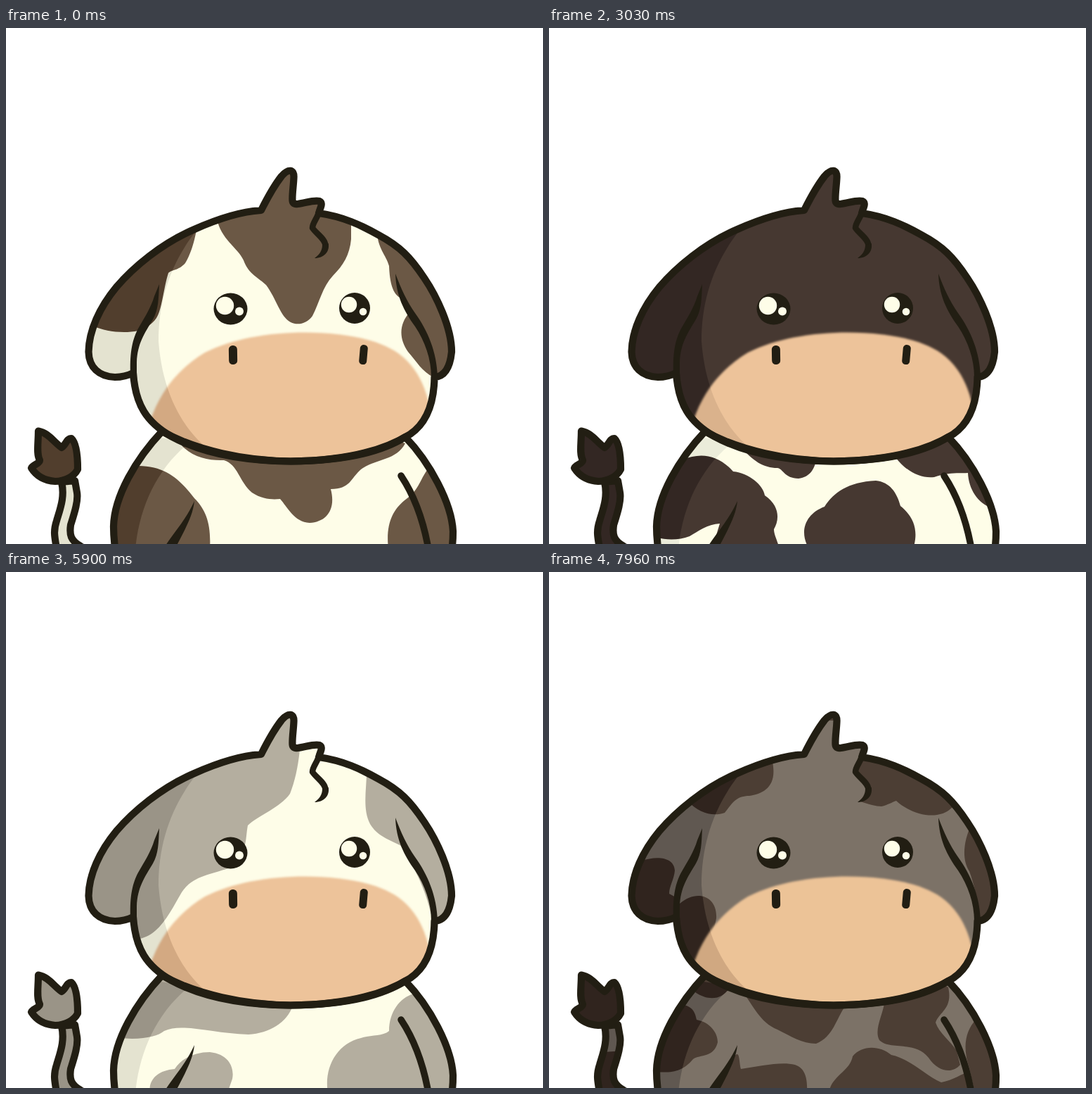
Recreate the animation shown at these times as an HTML page. Size 764 px wide and 733 px high, loop 8000 ms.

```html
<!DOCTYPE html>
<html lang="en">
<head>
<meta charset="utf-8">
<title>Cow coats</title>
<style>
html, body { margin: 0; width: 100%; height: 100%; overflow: hidden; background: #fff; }
svg { display: block; width: 100%; height: 100%; }
.coat { isolation: isolate; }
.shade { mix-blend-mode: difference; }
.line { fill: none; stroke: #221e13; stroke-width: 10.2; stroke-linecap: round; stroke-linejoin: round; }
.ink { fill: #221e13; }
.glint { fill: #fefde8; }
</style>
</head>
<body>
<svg viewBox="0 0 764 733" xmlns="http://www.w3.org/2000/svg">
  <defs>
    <path id="head" d="M363 259C372 241 383 222 392 210.5C402 199 410 201 409.5 212C409 225 407 235 407.5 245Q408 251 415 250C428 248 438 244 446 246Q450 248 448 254L445 263C480 268 505 280 530 294C560 310 575 325 595 355C612 380 634 425 634 460C632 480 625 495 609.5 496C609 530 600 560 575 577C530 605 470 615 405 615.5C340 615 280 605 235 580C200 560 184 535 181 490C175 493 166 496 155 496C132 495 118 482 117.5 460C118 430 133 397 157 368C181 340 221 306 268 286C295 274 330 261 363 259Z"/>
    <path id="body" d="M222 573C185 612 154 665 153 708Q153 725 156 745H633Q636 735 636 715C634 675 603 617 568 581C530 605 470 615 405 615.5C340 615 270 600 222 573Z"/>
    <path id="stem" d="M79 645C84 666 77 683 72 700C67 715 69 722 73 745H120L106 736C92 728 90 720 92 706C97 690 103 672 101 660L98 643Z"/>
    <path id="tuft" d="M46 572.5C60 575 68 588 79 596C85 593 86 583 93 583C101 590 102 612 102 627C97 637 84 644 70 644C55 643 43 636 36 625C40 619 48 619 48 614C43 605 46 590 46 572.5Z"/>
    <clipPath id="inHead"><use href="#head"/></clipPath>
    <clipPath id="inBody"><use href="#body"/><use href="#stem"/><use href="#tuft"/></clipPath>
    <filter id="soft"><feGaussianBlur stdDeviation="1.5"/></filter>
  </defs>
  <g id="coats"></g>
  <g class="line">
    <use href="#body"/>
    <use href="#stem"/>
    <use href="#tuft"/>
    <path stroke-width="9.5" d="M562 636C578 660 593 695 601 740"/>
    <use href="#head"/>
    <path stroke-width="8.5" d="M446 258C444 270 436 276 436 284C441 292 454 299 454.5 309"/>
  </g>
  <g class="ink">
    <path d="M458.7 306C461 318 452 327 439 327C446 322 450 316 450 308Z"/>
    <path d="M218 364C217 385 217 400 209 414C197 434 187 448 186 475V495L177 490C176 460 180 442 188 427C197 411 206 398 211 381Z"/>
    <path d="M554 349C562 370 570 388 582 405C600 430 613 460 614 496H605C605 470 596 445 582 424C566 402 555 380 554 349Z"/>
    <path d="M268 672C266 695 250 720 243 735H227C240 715 255 700 268 672Z"/>
    <ellipse cx="319.5" cy="399" rx="24" ry="22.5"/>
    <ellipse cx="496" cy="398" rx="22" ry="22"/>
    <rect x="317" y="451" width="12" height="27" rx="5.5" transform="rotate(-1 323 464)"/>
    <rect x="503" y="450" width="11" height="28" rx="5" transform="rotate(5 508 464)"/>
  </g>
  <g class="glint">
    <circle cx="311.5" cy="394.5" r="12.7"/>
    <circle cx="332" cy="402.5" r="6"/>
    <circle cx="488" cy="393" r="11.2"/>
    <circle cx="508" cy="403" r="5.3"/>
  </g>
</svg>
<script>
const ALL = "M0 0H764V740H0Z";
const TUFT = "M20 560H112V645H20Z";
const STEM = "M60 640H125V740H60Z";
const DARK = "#463831", BROWN = "#6b5845", TAN = "#9b8463", UMBER = "#5c4f3d";
const MUZZLE = "M200 575C212 530 235 490 283 461C323 441 375 432.5 425 432.5C480 433 527 441 558 462C582 479 597 507 603 540L620 640H200Z";
const HEAD_SHADE = "M277 280C235 330 217 385 217 445C222 510 245 565 292 602L80 620V250Z";
const BODY_SHADE = "M262 588C215 625 190 680 184 740H0V550Z";
const FAINT = "#13110e", LIGHT = "#1a1a18", DEEP = "#353532";

// Each coat: patch colour, shade strength, head patches, body and tail patches
const coats = [
  {
    color: BROWN, shade: LIGHT,
    head: [
      "M272 280C268 310 258 330 255 334C245 345 236 343 231 348C224 370 222 400 214 412C207 422 200 425 188 430C165 435 140 430 125 424L100 400L200 290Z",
      "M300 270C305 300 330 312 338 330C345 350 360 355 370 365C385 385 390 410 405 418C415 423 428 420 436 409C446 390 450 368 465 352C480 337 489 322 491 300V270L450 200L350 190Z",
      "M528 285C527 312 541 322 545 338C546 362 550 378 562 384C570 393 573 402 574 404C560 420 558 440 572 460C585 475 592 488 608 496L660 500L640 350L560 280Z"
    ],
    body: [
      "M250 593C265 610 290 615 310 614C330 620 332 645 350 660C365 670 380 670 390 669C400 680 410 702 432 703C455 702 470 685 462 655C490 655 490 640 505 627C525 612 555 615 568 590L500 570H300Z",
      "M140 650L188 622C230 622 250 645 268 668C285 685 292 705 290 740H140Z",
      "M604 622C588 640 590 655 567 671C550 685 540 705 544 740H660V640Z",
      TUFT
    ]
  },
  { color: BROWN, shade: LIGHT, head: [ALL], body: [ALL] },
  {
    color: TAN, shade: DEEP,
    head: [
      "M256 290C275 325 300 339 335 339C375 338 405 312 411 276C415 298 430 309 455 310C475 309 492 298 498 280L460 200L340 190Z",
      "M200 314C217 338 221 350 217 368L206 412L182 460V520H80L100 380Z",
      "M206 414C230 409 255 425 258 452C270 452 280 462 290 470L240 590H160L182 455Z",
      "M552 308C540 325 537 350 553 370L566 390C550 410 543 440 546 462L600 560H660V400L600 300Z"
    ],
    body: [
      "M182 636C200 650 230 660 255 657C280 655 300 640 302 626C315 635 340 632 358 618L220 555Z",
      "M168 655C172 685 200 700 210 740H130L140 660Z",
      "M270 740C285 715 288 690 312 686C340 682 385 700 393 720L397 740Z",
      "M466 615C445 630 437 645 439 660C445 680 470 685 485 692C500 705 515 713 535 713C560 713 575 700 592 700L604 740H660L640 600L560 560Z",
      TUFT, STEM
    ]
  },
  {
    color: DARK, shade: FAINT, head: [ALL],
    body: [
      "M272 594C290 615 305 625 325 625C332 625 335 640 355 640C372 638 378 625 380 614L300 585Z",
      "M190 613C215 603 240 605 262 630C285 632 305 650 307 664C330 680 327 700 320 712C320 720 325 728 328 740H232L243 704C225 705 212 715 200 722C185 728 165 727 155 724L130 700Z",
      "M370 740C355 715 365 690 392 680C405 660 425 645 465 643C485 645 495 660 500 679C520 695 526 715 518 740Z",
      "M493 610C510 632 530 640 548 638C570 630 585 633 596 632C597 655 610 675 630 682L650 680L580 560Z",
      TUFT, STEM
    ]
  },
  {
    color: DARK, shade: LIGHT,
    head: [
      "M331 262C340 290 360 300 386 299C400 310 412 323 427 326C440 338 455 335 462 320C468 308 467 300 470 289L486 286L491 291C484 305 488 328 508 331C526 332 530 316 527 305L536 298L500 250L440 200L360 190Z",
      "M546 303C540 325 530 340 534 362C540 382 555 387 568 386L584 416C595 418 610 412 622 404L660 400L600 300Z",
      "M596 438C610 436 620 430 632 424L660 500L604 525C600 505 585 485 584 465C585 450 592 442 596 438Z",
      "M248 294C255 312 275 320 295 317C310 312 315 295 312 268L280 262Z",
      "M235 296L240 318C258 325 274 338 274 357C273 375 258 388 235 389C225 390 218 397 208 397C200 385 185 387 175 390C165 393 155 392 140 390L120 380L200 290Z",
      "M115 441C140 432 160 442 164 465C166 480 164 490 163 505H100Z",
      "M206 418C230 410 250 420 251 440C250 458 225 470 218 485C212 500 200 507 184 502L178 460Z"
    ],
    body: ["M140 550H660V740H140Z", TUFT]
  },
  {
    color: DARK, shade: LIGHT,
    head: [
      "M419 240C417 270 412 295 404 315C390 335 360 345 344 360C340 380 345 400 316 421C290 430 265 432 250 455C235 480 220 515 190 521H80L100 380L340 190H420Z",
      "M513 278C514 305 506 335 518 358C528 375 545 380 562 389C590 435 600 460 609 505L660 500L640 380L560 280Z"
    ],
    body: [
      "M160 662C195 665 215 660 225 652C250 640 290 655 345 657C375 655 400 640 408 616L220 555L150 640Z",
      "M205 740C202 722 215 708 240 706C250 690 270 682 290 682C318 685 325 705 322 720L315 740Z",
      "M458 740C452 705 470 670 505 662C520 657 535 660 545 652C545 625 560 605 580 599L650 640L660 740Z",
      TUFT, STEM
    ]
  },
  { color: DARK, shade: LIGHT, head: [], body: [] },
  {
    color: UMBER, shade: "#31302a", muzzle: "#eac392",
    head: [
      "M196 324C215 345 235 347 250 342C260 330 265 318 285 318C305 315 325 305 318 270H270Z",
      "M447 258C442 275 436 283 438 285L452 300L456 312L443 326C455 330 465 333 473 333C482 331 488 327 494 325C510 340 535 348 552 345C565 343 570 338 576 332L500 250Z",
      "M602 356C588 385 588 410 598 425C605 445 612 470 610 500H660L640 380Z",
      "M130 411C155 402 178 406 179 424C178 437 171 446 171 457L184 464V505H100Z",
      "M186 471C210 450 240 460 238 492C235 510 228 520 222 530L245 595L160 560Z",
      "M395 211H413V195H395Z"
    ],
    body: [
      "M208 597C230 612 250 605 258 588L220 555Z",
      "M183 614C200 615 207 620 210 636C230 640 240 655 240 668C235 690 215 685 205 692C190 710 175 712 150 710L130 700Z",
      "M276 597C290 615 300 640 325 650C345 660 360 670 380 670C405 660 408 635 422 616L300 580Z",
      "M478 608C475 630 462 650 470 665C485 680 520 665 540 690C555 712 575 712 585 700L580 680C570 665 555 655 550 640C555 625 575 620 568 590L540 575Z",
      "M398 740C402 715 428 710 432 688C445 672 470 672 487 686C515 692 535 715 558 725C575 722 588 712 598 710L606 740Z",
      "M608 635C592 652 588 675 598 705L606 740H660L640 640Z",
      "M233 740L262 690C272 676 270 695 273 706C300 702 330 695 350 700C365 705 368 720 367 740Z",
      TUFT, "M60 683L125 679V740H60Z"
    ]
  },
  { color: DARK, shade: FAINT, head: [ALL], body: [ALL] }
];

const shape = (d, fill, extra = "") => `<path d="${d}" fill="${fill}" ${extra}/>`;

function part(clip, coat, patches, shade, top = "") {
  return `<g clip-path="url(#${clip})">` +
    shape(ALL, "#fefde8") +
    patches.map(d => shape(d, coat.color)).join("") + top +
    shape(shade, coat.shade, 'class="shade"') + "</g>";
}

const muzzle = coat => shape(MUZZLE, coat.muzzle || "#edc39a", 'filter="url(#soft)"');
const holder = document.getElementById("coats");
holder.innerHTML = coats.map(c => '<g class="coat">' +
  part("inBody", c, c.body, BODY_SHADE) +
  part("inHead", c, c.head, HEAD_SHADE, muzzle(c)) + "</g>").join("");
const layers = [...holder.children];

const LOOP = 8000, CYCLE = 1010, HOLD = 650, STEP = 40;

function draw(time) {
  const t = time % LOOP;
  const current = Math.floor(t / CYCLE);
  const since = t % CYCLE - HOLD;
  const mix = since < 0 ? 0 : Math.min(1, (Math.floor(since / STEP) + 1) / 10);
  layers.forEach((layer, i) => {
    const alpha = i === current ? 1 : i === current + 1 ? mix : 0;
    layer.style.display = alpha ? "" : "none";
    layer.style.opacity = alpha;
  });
}

const start = performance.now();
function tick() {
  draw(performance.now() - start);
  requestAnimationFrame(tick);
}
tick();
</script>
</body>
</html>
```
